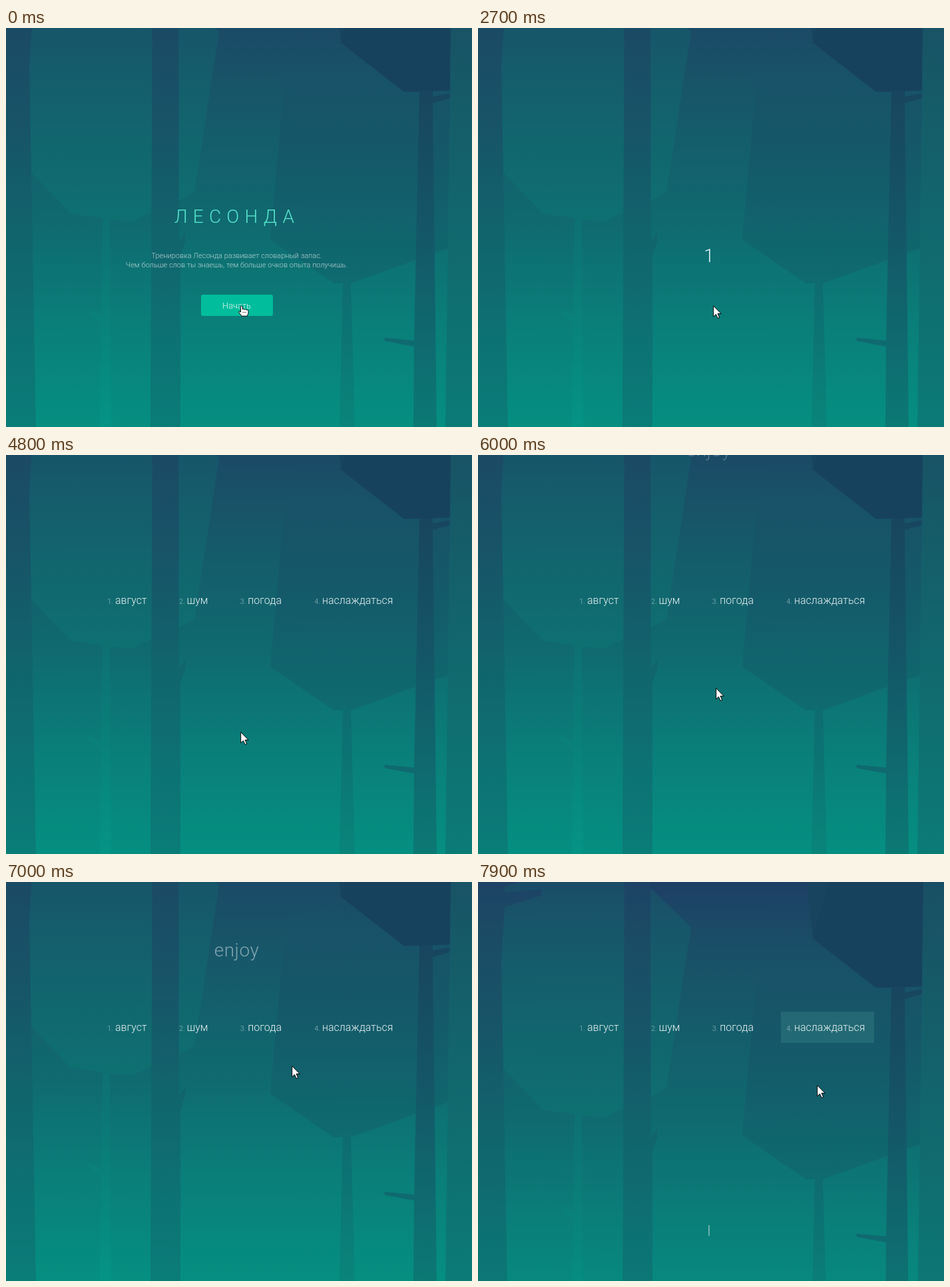
These frames come from a looping animation (700x600 px, 8 s). An HTML page:

```html
<!DOCTYPE html>
<html lang="ru">
<head>
<meta charset="utf-8">
<title>Лесонда</title>
<style>
html, body { margin: 0; width: 100%; height: 100%; overflow: hidden; background: #0f6a6f; }
svg { display: block; width: 700px; height: 600px; font-family: Roboto, sans-serif; font-weight: 300; }

/* Percentages are ms / 80; step-end keeps hard cuts, steps(n) moves every 100 ms */
.scene, .start, .digit, .answers, .hover, .word, .gem, .cursor, .arrow, .hand {
  animation: 8s step-end infinite;
}
.start, .digit, .answers, .hover, .word, .gem, .arrow { opacity: 0; }

.scene { animation-name: scroll; }
@keyframes scroll {
  0% { transform: translateY(0); }
  93.75% { transform: translateY(0); animation-timing-function: steps(4, end); }
  98.75%, 100% { transform: translateY(63px); }
}

.start { animation-name: intro; }
@keyframes intro { 0% { opacity: 1; } 8.75%, 100% { opacity: 0; } }
.title { font-size: 28px; letter-spacing: 8.2px; fill: #55e2ca; }
.note { font-size: 11px; fill: #fff; fill-opacity: .7; }
.label { font-size: 13px; fill: #e2f9f4; }

.digit { font-size: 28px; fill: #dff1f2; }
.three { animation-name: three; }
.two { animation-name: two; }
.one { animation-name: one; }
@keyframes three { 0% { opacity: 0; } 8.75% { opacity: 1; } 21.25%, 100% { opacity: 0; } }
@keyframes two { 0% { opacity: 0; } 21.25% { opacity: 1; } 33.75%, 100% { opacity: 0; } }
@keyframes one { 0% { opacity: 0; } 33.75% { opacity: 1; } 47.5%, 100% { opacity: 0; } }

.answers { animation-name: answers; font-size: 16px; fill: #e9f4f4; }
.answers .num { font-size: 11px; fill: #fff; fill-opacity: .52; }
@keyframes answers { 0% { opacity: 0; } 52.5% { opacity: .5; } 53.75%, 100% { opacity: 1; } }

.hover { animation-name: hover; }
@keyframes hover {
  0% { opacity: 0; fill: #fff; }
  90% { opacity: .12; fill: #fff; }
  95%, 100% { opacity: .13; fill: #7ddcc0; }
}

.word { animation-name: fall; font-size: 28px; letter-spacing: .5px; fill: #fff; }
@keyframes fall {
  0% { opacity: 0; transform: translateY(-20px); }
  72.5% { opacity: .21; transform: translateY(-20px); animation-timing-function: steps(18, end); }
  94.99% { opacity: .58; transform: translateY(178px); }
  95%, 100% { opacity: 0; transform: translateY(178px); }
}

.gem { animation-name: gem; }
@keyframes gem { 0% { opacity: 0; } 97.5%, 100% { opacity: .5; } }

.cursor { animation-name: pointer; }
@keyframes pointer {
  0%, 8.75% { transform: translate(354px, 417px); }
  27.5% { transform: translate(353px, 417px); }
  60% { transform: translate(352px, 416px); animation-timing-function: steps(6, end); }
  67.5% { transform: translate(357px, 354px); }
  72.5% { transform: translate(357px, 352px); }
  75% { transform: translate(357px, 350px); animation-timing-function: steps(6, end); }
  82.5% { transform: translate(357px, 348px); }
  83.75% { transform: translate(363px, 344px); }
  85% { transform: translate(380px, 325px); }
  86.25% { transform: translate(404px, 300px); }
  87.5% { transform: translate(429px, 276px); }
  88.75% { transform: translate(464px, 252px); }
  90% { transform: translate(500px, 231px); }
  91.25%, 95% { transform: translate(527px, 220px); }
  96.25% { transform: translate(522px, 252px); }
  97.5% { transform: translate(514px, 287px); }
  98.75%, 100% { transform: translate(509px, 305px); }
}
.hand { animation-name: hand; }
.arrow { animation-name: arrow; }
@keyframes hand {
  0% { opacity: 1; } 8.75% { opacity: 0; } 90% { opacity: 1; } 96.25%, 100% { opacity: 0; }
}
@keyframes arrow {
  0% { opacity: 0; } 8.75% { opacity: 1; } 90% { opacity: 0; } 96.25%, 100% { opacity: 1; }
}
</style>
</head>
<body>
<svg viewBox="0 0 700 600">
  <defs>
    <linearGradient id="sky" gradientUnits="userSpaceOnUse" x1="0" y1="-63" x2="0" y2="600">
      <stop offset="0" stop-color="#1e3f65"/>
      <stop offset=".095" stop-color="#1b4a66"/>
      <stop offset=".245" stop-color="#175669"/>
      <stop offset=".55" stop-color="#0f6b70"/>
      <stop offset=".77" stop-color="#0a7f79"/>
      <stop offset="1" stop-color="#058f81"/>
    </linearGradient>
    <linearGradient id="pale" gradientUnits="userSpaceOnUse" x1="0" y1="-63" x2="0" y2="600">
      <stop offset="0" stop-color="#1b4c67"/>
      <stop offset=".095" stop-color="#17566a"/>
      <stop offset=".32" stop-color="#12646e"/>
      <stop offset=".53" stop-color="#0e7071"/>
      <stop offset="1" stop-color="#049485"/>
    </linearGradient>
    <linearGradient id="shade" gradientUnits="userSpaceOnUse" x1="0" y1="40" x2="0" y2="600">
      <stop offset="0" stop-color="#19506a" stop-opacity="0"/>
      <stop offset=".13" stop-color="#175468"/>
      <stop offset=".3" stop-color="#145a6a"/>
      <stop offset=".61" stop-color="#0e6b6f"/>
      <stop offset="1" stop-color="#09857b"/>
    </linearGradient>
    <linearGradient id="trunk" gradientUnits="userSpaceOnUse" x1="0" y1="-63" x2="0" y2="600">
      <stop offset="0" stop-color="#1d4265"/>
      <stop offset=".095" stop-color="#1b4a65"/>
      <stop offset=".32" stop-color="#175468"/>
      <stop offset=".55" stop-color="#11636c"/>
      <stop offset="1" stop-color="#0a7d78"/>
    </linearGradient>
    <linearGradient id="near" gradientUnits="userSpaceOnUse" x1="0" y1="90" x2="0" y2="600">
      <stop offset="0" stop-color="#18455f"/>
      <stop offset=".4" stop-color="#145567"/>
      <stop offset="1" stop-color="#0b7974"/>
    </linearGradient>
    <linearGradient id="side" gradientUnits="userSpaceOnUse" x1="0" y1="-63" x2="0" y2="600">
      <stop offset="0" stop-color="#194f64"/>
      <stop offset=".5" stop-color="#12666c"/>
      <stop offset="1" stop-color="#0b7b76"/>
    </linearGradient>
  </defs>

  <g class="scene">
    <path fill="url(#sky)" d="M0-63H700V600H0Z"/>
    <path fill="url(#pale)" d="M30-63H250L259-54 320 5 283 247 262 258 218 277 190 291 156 288 158 600H141L143 444 125 428 121 422 143 431 145 286 97 279 38 217Z"/>
    <path fill="url(#shade)" d="M432 40 417 90 397 318 492 384H506L501 600H524L518 384 614 349 668 330V40Z"/>
    <path fill="url(#trunk)" d="M220-63H259L260 320 270 308 269 322 262 342V600H217Z"/>
    <path fill="url(#trunk)" d="M0-63H62L40-56V-47L96-52 95-43 40-25 35 60 38 217 45 600H0Z"/>
    <path fill="url(#near)" d="M621 94H641V103L668 98V105L641 113 647 600H612L613 479 570 471 567 467 571 466 613 470Z"/>
    <path fill="#18445f" d="M494-63 503 22 598 96 668 94V-63Z"/>
    <path fill="#17425d" d="M527-63 503 22 598 96 668 94V-63Z"/>
    <path fill="url(#side)" d="M669-63H700V600H660Z"/>
  </g>

  <g class="start" text-anchor="middle">
    <text class="title" x="347" y="293">ЛЕСОНДА</text>
    <text class="note" x="346.5" y="346">Тренировка Лесонда развивает словарный запас.</text>
    <text class="note" x="346.5" y="360">Чем больше слов ты знаешь, тем больше очков опыта получишь.</text>
    <rect x="293" y="401" width="108" height="32" rx="3" fill="#02bd9c"/>
    <text class="label" x="346.5" y="422">Начать</text>
  </g>

  <g text-anchor="middle">
    <text class="digit three" x="347" y="352">3</text>
    <text class="digit two" x="347" y="352">2</text>
    <text class="digit one" x="347" y="352">1</text>
    <text class="word" x="346.5" y="0">enjoy</text>
  </g>

  <rect class="hover" x="455" y="195" width="140" height="47"/>
  <g class="answers">
    <text y="224"><tspan class="num" x="152">1.</tspan><tspan x="164">август</tspan></text>
    <text y="224"><tspan class="num" x="260">2.</tspan><tspan x="271.5">шум</tspan></text>
    <text y="224"><tspan class="num" x="351.7">3.</tspan><tspan x="363.3">погода</tspan></text>
    <text y="224"><tspan class="num" x="463.3">4.</tspan><tspan x="475">наслаждаться</tspan></text>
  </g>

  <path class="gem" fill="#fff" d="M346.2 516H347.8V532H346.2Z"/>

  <g class="cursor" fill="#fff" stroke="#000" stroke-linejoin="round">
    <path class="arrow" d="M.7 .8V17L4.5 13.6 7.2 19.4 9.7 18.3 7.1 12.6H12.2Z"/>
    <g class="hand" transform="translate(-5 0)">
      <path d="M3.2 1.7Q4.7 0 6.2 1.7V6Q7.7 4.9 8.8 6.2Q10.4 5.3 11.6 6.8Q14 6.2 15 8.2V12L13.4 16.2H5.2L1 11Q.2 9 2 8.8L3.6 10.2Z"/>
      <path fill="none" stroke-dasharray="1 1" d="M6.5 10.5H12.5"/>
    </g>
  </g>
</svg>
</body>
</html>
```
